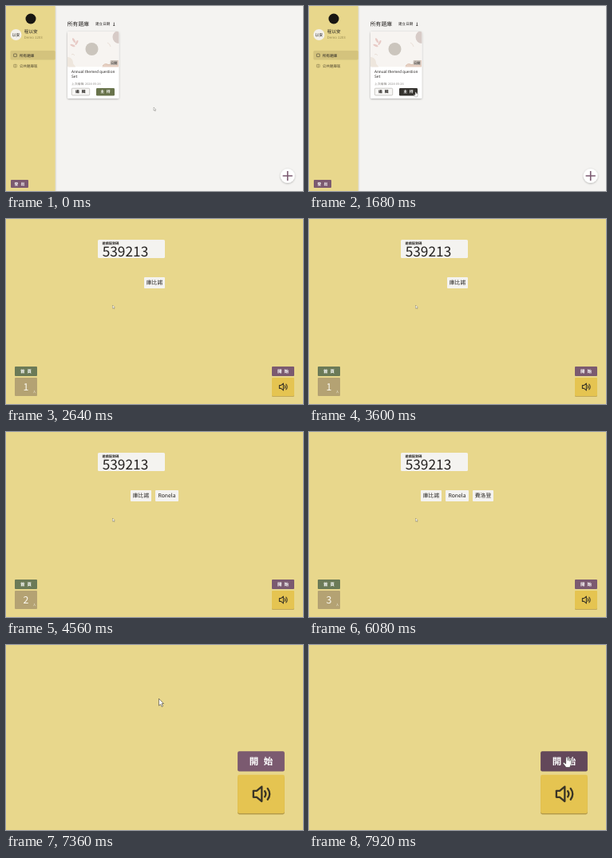
These frames come from a looping animation (372x232 px, 8000 ms). An HTML page:

```html
<!DOCTYPE html>
<html lang="en">
<head>
<meta charset="utf-8">
<title>Quiz lobby</title>
<style>
  html, body { margin: 0; width: 100%; height: 100%; overflow: hidden; background: #e8d78c; }
  svg { display: block; width: 100vw; height: 100vh; }
  text {
    font-family: "Noto Sans CJK TC", "Noto Sans CJK", "Noto Sans", sans-serif;
    text-rendering: geometricPrecision;
    white-space: pre;
  }
</style>
</head>
<body>
<svg id="stage" viewBox="0 0 372 232" xmlns="http://www.w3.org/2000/svg"></svg>
<script>
const LOOP = 8000, STEP = 80;
const INK = '#24211f', PAPER = '#f4f3f0', SAND = '#e8d78c', PLUM = '#7b5a70';

const rect = (x, y, w, h, fill, r = 0, more = '') =>
  `<rect x="${x}" y="${y}" width="${w}" height="${h}" rx="${r}" fill="${fill}" ${more}/>`;
const circle = (x, y, r, fill, more = '') =>
  `<circle cx="${x}" cy="${y}" r="${r}" fill="${fill}" ${more}/>`;
const path = (d, fill, more = '') => `<path d="${d}" fill="${fill}" ${more}/>`;
const text = (x, y, size, str, fill = INK, more = '') =>
  `<text x="${x}" y="${y}" font-size="${size}" fill="${fill}" ${more}>${str}</text>`;
const mid = (x, y, size, str, fill, more = '') =>
  text(x, y, size, str, fill, `text-anchor="middle" ${more}`);

const MEDIUM = 'font-weight="500"', BOLD = 'font-weight="700"';

// Two-character button label with a wide gap
const pair = (cx, y, size, gap, str, fill) =>
  mid(cx - gap / 2, y, size, str[0], fill, BOLD) + mid(cx + gap / 2, y, size, str[1], fill, BOLD);

function sidebar() {
  return rect(0, 0, 61.6, 232, SAND, 0, 'filter="url(#soft)"') +
    circle(31, 16, 6.5, '#181612') +
    circle(12.5, 36, 7, '#f3f0ea') +
    mid(12.5, 37.8, 4.8, '以安', INK, MEDIUM) +
    text(22.8, 33.6, 5.6, '程以安', INK, MEDIUM) +
    text(22.8, 41, 4.4, 'Demo 1203', '#988a50') +
    rect(5.5, 56, 56.1, 11.6, '#d4c37d', 1.5) +
    rect(9.6, 60, 3.8, 3.6, 'none', 0.5, 'stroke="#4a4434" stroke-width=".6"') +
    text(17, 63.8, 4.6, '所有題庫', INK, MEDIUM) +
    rect(9.6, 73.3, 3.8, 3.6, 'none', 0.5, 'stroke="#7c7045" stroke-width=".5"') +
    path('M11.5 73.3v3.6', 'none', 'stroke="#7c7045" stroke-width=".5"') +
    text(17, 77, 4.5, '公共題庫區', '#4c442c', MEDIUM) +
    rect(6, 218, 22, 10, PLUM, 1) +
    pair(17, 224.8, 4.8, 8, '登出', '#fff');
}

function cover() {
  return `<g clip-path="url(#cover)">` +
    rect(77, 32, 64.4, 44.6, '#f7f4f1') +
    circle(141.5, 39, 8, '#d7cbc7') +
    path('M77 64c5 0 7 4 7 7s3 3 3 6H77z', '#eee6dd') +
    path('M120 77c3-6 6-4 9-4s4-6 12-5v9z', '#e6cfc2') +
    path('M121 75c4-5 6 0 10-2', 'none', 'stroke="#d9bfae" stroke-width="1"') +
    [[85, 43.2, 62], [88.5, 46, 118], [83.5, 49.5, 20]].map(([x, y, a]) =>
      `<ellipse cx="${x}" cy="${y}" rx="3.3" ry="1.3" fill="#e8cbc6" transform="rotate(${a} ${x} ${y})"/>`).join('') +
    path('M82 61q2-2 4 1M127 46q3 1 4 5', 'none', 'stroke="#e4d6cc" stroke-width=".7"') +
    circle(107.5, 54, 8, '#cbc5bd') +
    rect(130.6, 68, 9.4, 6, '#c9c0b9', 1) +
    mid(135.3, 72.6, 4, '公開', INK, MEDIUM) + `</g>`;
}

function library() {
  return rect(0, 0, 372, 232, '#f4f3f1') + sidebar() +
    text(76.8, 24.8, 6.8, '所有題庫', INK, MEDIUM) +
    text(112, 24.4, 4.6, '建立日期', INK, MEDIUM) +
    path('M135.3 20.6v4.4m-1-1l1 1 1-1', 'none', `stroke="${INK}" stroke-width=".7"`) +
    rect(77, 32, 64.4, 84, '#fff', 1.5, 'filter="url(#soft)"') + cover() +
    text(82, 84.2, 4.75, 'Annual themed question', INK, MEDIUM) +
    text(82, 90.2, 4.75, 'Set', INK, MEDIUM) +
    text(82, 98.7, 3.8, '上次編輯: 2024-05-26', '#8e8b88') +
    rect(82.3, 103.2, 22.4, 8.8, '#f8f7f5', 1.2, 'stroke="#a9a6a2" stroke-width=".6"') +
    pair(93.3, 109.3, 4.8, 7.6, '編輯', INK) +
    `<rect id="host" x="113" y="103" width="23" height="9.4" rx="1.2"/>` +
    pair(124.4, 109.3, 4.8, 7.6, '主持', '#fff') +
    circle(352.7, 213, 9, '#fff', 'filter="url(#soft)"') +
    path('M346.6 213h12.2M352.7 206.9v12.2', 'none', `stroke="${PLUM}" stroke-width="1.6"`);
}

const players = [['庫比諾', 26], ['Ronela', 29], ['費洛登', 26]];
const CHIP_GAP = 5;

function lobby() {
  const chips = players.map(([name, w]) => `<g class="chip">` +
    rect(0, 73, w, 14, PAPER, 1) + mid(w / 2, 82.4, 6.8, name, INK, MEDIUM) + `</g>`).join('');
  return rect(-10, -10, 392, 252, SAND) +
    rect(115, 26, 84, 23, PAPER, 1.6) +
    text(120.6, 31.8, 4.2, '遊戲配對碼', INK, BOLD) +
    text(120.7, 47, 17.3, '539213') + chips +
    rect(11, 185, 28, 12, '#6b7a57', 1) +
    pair(25, 193, 5.5, 8.6, '首頁', '#fff') +
    rect(11, 199, 28, 23, '#b4a273', 1) +
    `<text id="count" x="25" y="215.2" font-size="12.4" fill="#fbf8ee" text-anchor="middle" ${MEDIUM}></text>` +
    mid(35.6, 218, 3.8, '人', '#fbf8ee', MEDIUM) +
    `<rect id="start" x="333" y="185" width="28" height="12" rx="1"/>` +
    pair(347, 193, 5.5, 8.6, '開始', '#fff') +
    rect(333, 200, 28, 22.7, '#b59b4a', 1) +
    rect(333, 199, 28, 23, '#e5c451', 1) +
    `<g fill="none" stroke="#3a3526" stroke-width="1.1" stroke-linecap="round" stroke-linejoin="round">` +
    `<path d="M342.4 208.6h2l3-2.5v8.8l-3-2.5h-2z"/>` +
    `<path d="M349.2 208.8q1.2 1.7 0 3.4M350.9 207.2q2.4 3.3 0 6.6"/></g>`;
}

const cursors =
  path('M0 0v4.2l1-.9.7 1.5.7-.3-.7-1.5h1.2z', '#fff',
    `id="arrow" stroke="${INK}" stroke-width=".25" stroke-linejoin="round"`) +
  path('M-.5 0q.5-.5 .9 0l.4 2 .2-1.4q.5-.4.8 0v1.6l.4-.9q.5-.2.7.2l-.3 2.6-.8 1.9h-2.2l-1.9-2.5q.1-.6.7-.4l1 .8z',
    '#fff', `id="hand" stroke="${INK}" stroke-width=".25" stroke-linejoin="round"`);

const stage = document.getElementById('stage');
stage.innerHTML =
  `<defs><filter id="soft" x="-20%" y="-20%" width="140%" height="140%">` +
  `<feDropShadow dx="0" dy=".7" stdDeviation=".9" flood-color="#000" flood-opacity=".32"/></filter>` +
  `<clipPath id="cover"><rect x="77" y="32" width="64.4" height="44.6" rx="1.5"/></clipPath></defs>` +
  `<g id="camera"><g id="library">${library()}</g><g id="lobby">${lobby()}</g>` +
  `<g id="cursor">${cursors}</g></g>`;

const el = id => document.getElementById(id);
const chips = [...document.querySelectorAll('.chip')];
const show = (node, on) => node.setAttribute('display', on ? 'inline' : 'none');

const OPEN = 1840, JOINS = [2320, 3920, 5440];
const ZOOM = { from: 6560, to: 7380, scale: 2.1 };

// time, x, y of the pointer in unzoomed coordinates
const route = [
  [80, 185, 127], [320, 133.5, 108], [6960, 133.5, 108],
  [7600, 311, 161], [7840, 348.6, 188.6]
];

const clamp = p => Math.min(1, Math.max(0, p));
const easeInOut = p => p < .5 ? 4 * p ** 3 : 1 - (2 - 2 * p) ** 3 / 2;
const easeOut = p => 1 - (1 - p) ** 2;

function pointerAt(t) {
  let [, x, y] = route[0];
  for (let i = 1; i < route.length; i++) {
    const [t0, x0, y0] = route[i - 1], [t1, x1, y1] = route[i];
    if (t < t0) break;
    const p = easeOut(clamp((t - t0) / (t1 - t0)));
    x = x0 + (x1 - x0) * p;
    y = y0 + (y1 - y0) * p;
  }
  return [x, y];
}

function layoutChips(n) {
  const total = players.slice(0, n).reduce((sum, [, w]) => sum + w, 0) + CHIP_GAP * (n - 1);
  let x = Math.floor(186 - total / 2);
  chips.forEach((chip, i) => {
    show(chip, i < n);
    chip.setAttribute('transform', `translate(${x} 0)`);
    x += players[i][1] + CHIP_GAP;
  });
}

function draw(t) {
  const inLobby = t >= OPEN;
  const joined = JOINS.filter(at => t >= at).length;
  const overHost = !inLobby && t >= 320;
  const overStart = t >= 7760;
  const [x, y] = pointerAt(t);
  const zoom = 1 + (ZOOM.scale - 1) * easeInOut(clamp((t - ZOOM.from) / (ZOOM.to - ZOOM.from)));

  show(el('library'), !inLobby);
  show(el('lobby'), inLobby);
  el('host').setAttribute('fill', overHost ? '#34322e' : '#68734b');
  el('start').setAttribute('fill', overStart ? '#63485a' : PLUM);
  el('count').textContent = joined;
  layoutChips(joined);
  show(el('hand'), overHost || overStart);
  show(el('arrow'), !overHost && !overStart);
  el('cursor').setAttribute('transform', `translate(${x} ${y})`);
  el('camera').setAttribute('transform',
    `translate(${372 * (1 - zoom)} ${232 * (1 - zoom)}) scale(${zoom})`);
}

const begin = performance.now();
function tick() {
  const t = (performance.now() - begin) % LOOP;
  draw(Math.floor(t / STEP) * STEP);
  requestAnimationFrame(tick);
}
tick();
</script>
</body>
</html>
```
